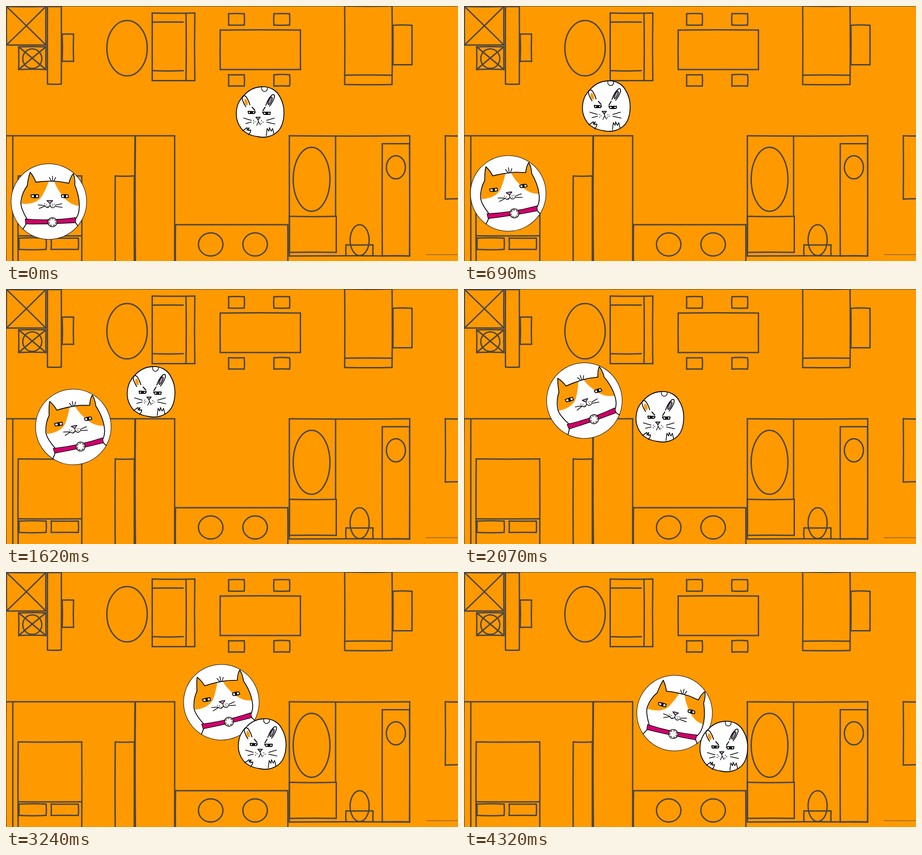
Write an HTML page that moves like this. It is 997 px wide and 562 px high and loops after 4350 ms.

```html
<!DOCTYPE html>
<html lang="en">
<head>
<meta charset="utf-8">
<title>Cat and rabbit at home</title>
<style>
html, body { margin: 0; width: 100%; height: 100%; overflow: hidden; background: #f90; }
svg { display: block; width: 997px; height: 562px; stroke-linejoin: round; stroke-linecap: round; }
</style>
</head>
<body>
<svg viewBox="0 0 997 562" fill="none">
  <rect width="997" height="562" fill="#f90"/>
  <g id="plan" stroke="#4b4542" stroke-width="3"></g>

  <g id="cat" stroke="#000" stroke-width="1.8">
    <g transform="translate(-94.5 -431)">
      <circle cx="94.5" cy="431" r="83.3" fill="#fff" stroke-width="1"/>
      <g fill="#f90" stroke="none">
        <path d="M54 366L66 387 95 386Q88 405 78 421Q64 438 34 435Q36 412 48 394Z"/>
        <path d="M107 387L139 391 149 370 152 394Q160 415 161 441Q141 439 127 421Q113 405 107 387Z"/>
      </g>
      <path d="M46 469Q31 443 33 430Q36 410 47 396Q50 376 54 366Q62 376 66 388Q90 385 117 387L139 391Q143 376 149 370Q153 380 152 395Q164 425 161 450Q160 460 154 469M44 480L37 491M153 478L158 485"/>
      <path d="M96 378L100 385M103 375V386M110 378L106 386" stroke-width="1.5"/>
      <path d="M55 416Q64 415 72 416V422Q62 423 56 421ZM122 417Q130 415 137 417L138 422Q130 424 123 422Z" fill="#fff"/>
      <path d="M62 416H66V422H62ZM128 417H132V422H128Z" fill="#000" stroke-width="1"/>
      <path d="M90 429Q97 428 103 429L97 435Z" fill="#c9a0cc" stroke-width="1.5"/>
      <path d="M97 435V440M87 441Q91 448 97 440Q102 449 109 441M71 438L85 440M73 446L86 441M109 439L123 436M110 442L124 444" stroke-width="1.5"/>
      <path d="M85 436h.1M89 438h.1M92 442h.1M103 441h.1M106 437h.1M102 437h.1"/>
      <path d="M42 469Q98 474 153 467V478Q98 481 43 480Z" fill="#d0006c" stroke-width="1.3"/>
      <circle cx="102" cy="476.5" r="10" fill="#fff" stroke-width="1.6"/>
      <circle cx="102" cy="476.5" r="7.3" stroke-width="1.3" stroke-dasharray="3.2 3.4"/>
    </g>
  </g>

  <g id="rabbit" stroke="#000" stroke-width="1.8">
    <g transform="translate(-560.5 -233.5)">
      <path d="M508 235C509 215 517 205 524 198C534 186 548 179 563 178C583 177 597 186 604 200C611 212 614 225 613 240C612 258 606 273 594 281C582 289 570 291 556 288C540 286 528 281 519 270C512 261 507 250 508 235Z" fill="#fff"/>
      <path d="M564 179C562 191 577 192 577 180" stroke-width="1.5"/>
      <path d="M529 222Q521 210 521 201Q525 194 531 202Q536 210 538 218M573 219Q578 204 587 196Q593 193 592 201Q588 213 581 221"/>
      <ellipse cx="529.5" cy="212" rx="3.6" ry="7.5" fill="#f90" stroke="none" transform="rotate(-17 529.5 212)"/>
      <ellipse cx="582.5" cy="209" rx="3" ry="9" fill="#a58fa8" stroke-width="1.5" transform="rotate(25 582.5 209)"/>
      <path d="M534 232L550 233 548 237 535 237ZM566 234L583 234 582 239 569 239ZM543 223L549 230M566.5 231L571.5 223" stroke-width="2"/>
      <path d="M539 233H544V236H539ZM573 235H578V238H573Z" fill="#000" stroke-width="1"/>
      <path d="M551 245H561L556 251Z" fill="#b78fb8" stroke-width="1.5"/>
      <path d="M556 251L557 256M553 263L557 255 561 262M524 247L541 252M529 259L541 256M575 252L592 247M575 256L593 260" stroke-width="1.5"/>
      <path d="M546 252h.1M549 255h.1M546 258h.1M564 253h.1M567 256h.1M563 259h.1"/>
      <path d="M522 275L532 268 532 274 536 268 535 275 540 273 539 278 535 284M574 286L576 270 580 276 581 268 585 276 588 270 591 282" stroke-width="1.6"/>
    </g>
  </g>
</svg>
<script>
const LOOP = 4350, STEP = 30;
const byId = id => document.getElementById(id);

// Floor plan, drawn with slightly bowed strokes
let seed = 7;
const bow = () => (seed = seed * 16807 % 2147483647) / 2147483647 * 3 - 1.5;

function add(tag, attrs) {
  const node = document.createElementNS("http://www.w3.org/2000/svg", tag);
  for (const name in attrs) node.setAttribute(name, attrs[name]);
  byId("plan").append(node);
}

function stroke(x1, y1, x2, y2, width = 3) {
  const mx = (x1 + x2) / 2 + bow(), my = (y1 + y2) / 2 + bow();
  add("path", { d: `M${x1} ${y1}Q${mx} ${my} ${x2} ${y2}`, "stroke-width": width });
}

function box(x, y, w, h) {
  const r = x + w, b = y + h;
  stroke(x, y, r, y);
  stroke(r, y, r, b);
  stroke(r, b, x, b);
  stroke(x, b, x, y);
}

function crossed(x, y, w, h) {
  box(x, y, w, h);
  stroke(x, y, x + w, y + h);
  stroke(x + w, y, x, y + h);
}

const oval = (cx, cy, rx, ry) => add("ellipse", { cx, cy, rx, ry });

function drawPlan() {
  add("path", { d: "M0 562V0H997", "stroke-width": 2 });

  // Hall and living room
  crossed(1, 1, 87, 85);
  crossed(28, 90, 60, 50);
  oval(58, 116, 21, 21.5);
  box(91.5, 1, 30.5, 171);
  box(124, 62, 25, 60);
  oval(267, 93, 44.5, 61);
  box(322.5, 15.5, 94, 149);
  stroke(397, 16, 397, 164);
  for (const y of [35.5, 142.5]) stroke(324, y, 391, y);

  // Dining table, chairs and sofa
  box(472.5, 53, 177, 87);
  for (const x of [491, 591]) for (const y of [17, 151.5]) box(x, y, 34.5, 25);
  box(747, 0, 104.5, 173);
  stroke(748, 152.5, 851, 152.5);
  box(853.5, 42.5, 42, 87);

  // Bedroom
  box(0, 286, 372, 300);
  stroke(15, 287, 15, 562);
  stroke(285, 287, 285, 562, 4);
  box(241, 374.5, 42, 200);
  box(27, 374.5, 140, 200);
  stroke(27, 506.5, 166, 506.5);
  for (const x of [28.5, 99.5]) box(x, 511.5, 60, 25);

  // Kitchen and bathroom
  box(374, 482, 247.5, 100);
  for (const x of [451.5, 549.5]) oval(x, 525.5, 27, 25.5);
  box(625, 286, 265.5, 265);
  stroke(727, 287, 727, 463);
  box(625, 463.5, 103.5, 79.5);
  oval(674, 382, 40.5, 70.5);
  box(830, 303.5, 60, 247.5);
  oval(860, 355.5, 21, 25.5);
  oval(780, 516, 21, 34);
  box(750, 526.5, 59.5, 24);
  box(969, 286, 60, 139.5);
  add("path", { d: "M927 548H997", "stroke-width": 1 });
}

// Key poses: time, x, y, angle
const actors = {
  cat: [
    [0, 94.5, 431, -.5], [690, 97.5, 413, -8], [1200, 98, 418, -9],
    [1620, 148.5, 304, -11], [2070, 265.5, 246, -18], [2310, 335, 230, -14],
    [2670, 441, 262, -9], [2730, 458, 266, -9], [3240, 475, 287, -12],
    [3810, 473.5, 294, -13], [4320, 464.5, 311, 13]
  ],
  rabbit: [
    [0, 560.5, 233.5, 0], [1020, 285, 219, 0], [1620, 320, 226.5, 0],
    [2070, 432, 281.5, 0], [2670, 548, 370, 0], [2730, 558, 375.5, 0],
    [3240, 565, 379, 0], [3810, 572.5, 385, 13], [4320, 573, 384.5, 0]
  ]
};

const slope = (keys, i, c) =>
  (keys[i + 1][c] - keys[i][c]) / (keys[i + 1][0] - keys[i][0]);

// Harmonic mean of neighbouring slopes avoids overshoot; the ends are parabolic
function tangent(keys, i, c) {
  const last = keys.length - 1;
  if (i === 0) return 2 * slope(keys, 0, c) - tangent(keys, 1, c);
  if (i === last) return 2 * slope(keys, last - 1, c) - tangent(keys, last - 1, c);
  const a = slope(keys, i - 1, c), b = slope(keys, i, c);
  return a * b > 0 ? 2 * a * b / (a + b) : 0;
}

function pose(keys, t) {
  let i = 0;
  while (i < keys.length - 2 && t >= keys[i + 1][0]) i++;
  const [p, q] = [keys[i], keys[i + 1]];
  const span = q[0] - p[0], u = (t - p[0]) / span, v = 1 - u;
  return [1, 2, 3].map(c =>
    v * v * (1 + 2 * u) * p[c] + u * u * (3 - 2 * u) * q[c] +
    span * u * v * (v * tangent(keys, i, c) - u * tangent(keys, i + 1, c)));
}

function draw() {
  const t = Math.floor(performance.now() % LOOP / STEP) * STEP;
  for (const id in actors) {
    const [x, y, angle] = pose(actors[id], t);
    byId(id).setAttribute("transform", `translate(${x} ${y}) rotate(${angle})`);
  }
  requestAnimationFrame(draw);
}

drawPlan();
draw();
</script>
</body>
</html>
```
